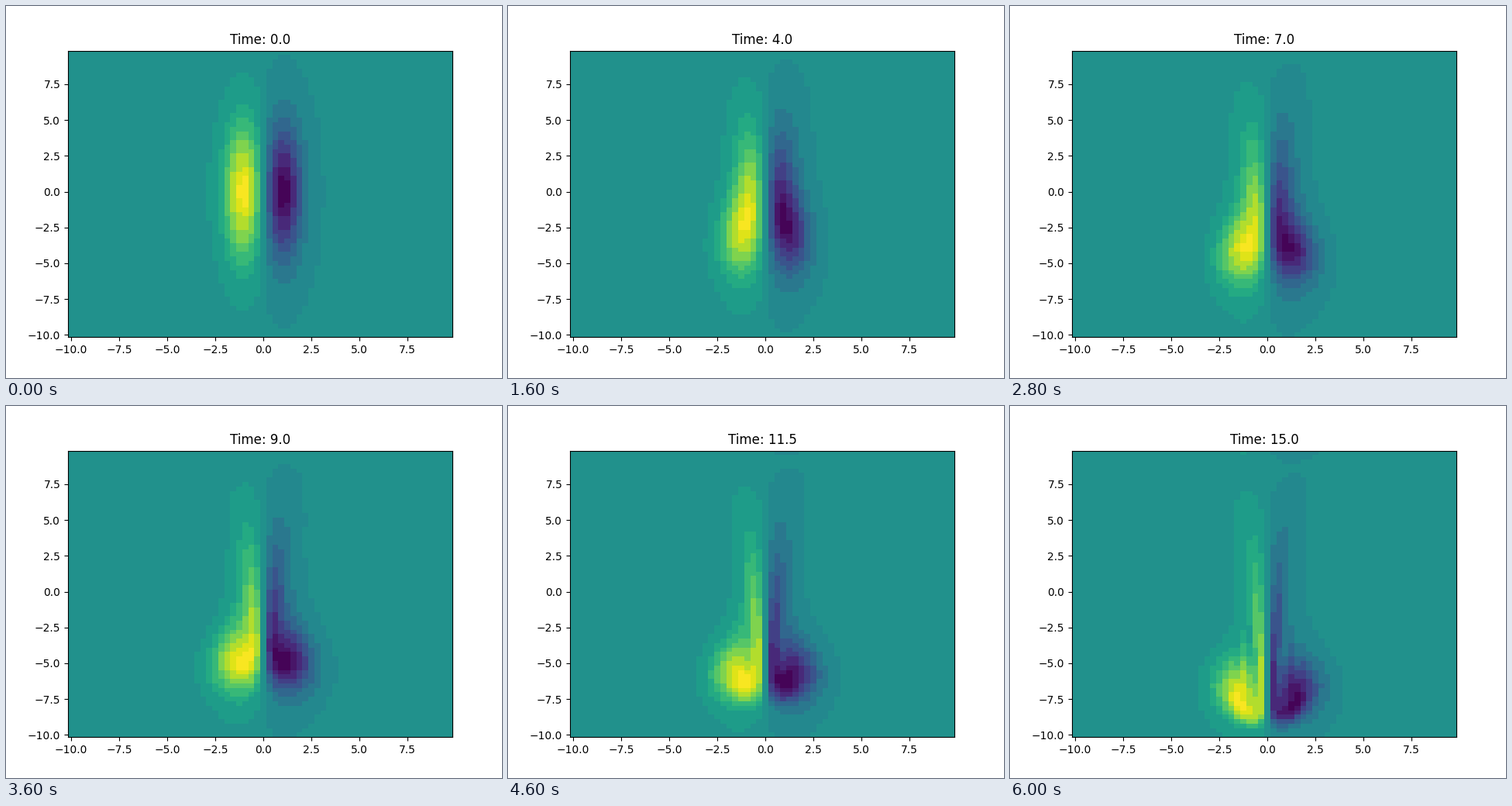
A matplotlib script that plays this animation: 640x480 px, repeating every 6.2 s.

```python
import numpy as np
import matplotlib.pyplot as plt
from matplotlib.animation import FuncAnimation
from matplotlib.colors import BoundaryNorm, ListedColormap

N, L, NU = 64, 20.0, 0.001
FRAMES, STEP, SUB = 31, 0.5, 10

h = L / N
x = -L / 2 + h * np.arange(N)
X, Y = np.meshgrid(x, x)

k = 2 * np.pi * np.fft.fftfreq(N, h)
K2 = k[:, None] ** 2 + k[None, :] ** 2
K2[0, 0] = 1e-12


def diff(a, axis):
    return (np.roll(a, -1, axis) - np.roll(a, 1, axis)) / (2 * h)


def laplacian(a):
    around = sum(np.roll(a, s, ax) for s in (-1, 1) for ax in (0, 1))
    return (around - 4 * a) / h ** 2


def rhs(w):
    """Vorticity advected by its own stream function, plus diffusion."""
    psi = np.fft.ifft2(-np.fft.fft2(w) / K2).real
    advect = diff(psi, 1) * diff(w, 0) - diff(psi, 0) * diff(w, 1)
    return NU * laplacian(w) + advect


def rk4(w, dt):
    a = rhs(w)
    b = rhs(w + dt / 2 * a)
    c = rhs(w + dt / 2 * b)
    d = rhs(w + dt * c)
    return w + dt / 6 * (a + 2 * b + 2 * c + d)


def simulate():
    w = (np.exp(-(X + 1) ** 2 - Y ** 2 / 20)
         - np.exp(-(X - 1) ** 2 - Y ** 2 / 20))
    states = [w]
    for _ in range(FRAMES - 1):
        for _ in range(SUB):
            w = rk4(w, STEP / SUB)
        states.append(w)
    return states


def scaled(w):
    """Stretch the values to -1..1."""
    lo, hi = w.min(), w.max()
    return 2 * (w - lo) / (hi - lo) - 1


states = simulate()

# Viridis reduced to a few flat steps
edges = np.array([-1.01, -0.94, -0.84, -0.70, -0.55, -0.41, -0.27, -0.125,
                  -0.0105, 0.032, 0.157, 0.27, 0.41, 0.53, 0.69, 0.85,
                  0.95, 1.01])
mids = (edges[:-1] + edges[1:]) / 2
mids[len(mids) // 2] = 0
mids[0], mids[-1] = -0.98, 0.98
cmap = ListedColormap(plt.get_cmap("viridis")((mids + 1) / 2))
norm = BoundaryNorm(edges, len(mids))

plt.rcParams["font.family"] = "DejaVu Sans"
fig, ax = plt.subplots(figsize=(6.4, 4.8), dpi=100)
mesh = ax.pcolormesh(X, Y, scaled(states[0]), cmap=cmap, norm=norm,
                     shading="nearest")
title = ax.set_title("Time: 0.0")


def update(i):
    mesh.set_array(scaled(states[i]))
    title.set_text(f"Time: {i * STEP:.1f}")
    return mesh, title


anim = FuncAnimation(fig, update, frames=FRAMES, interval=200,
                     repeat=True, repeat_delay=0, blit=False)
plt.show()
```
